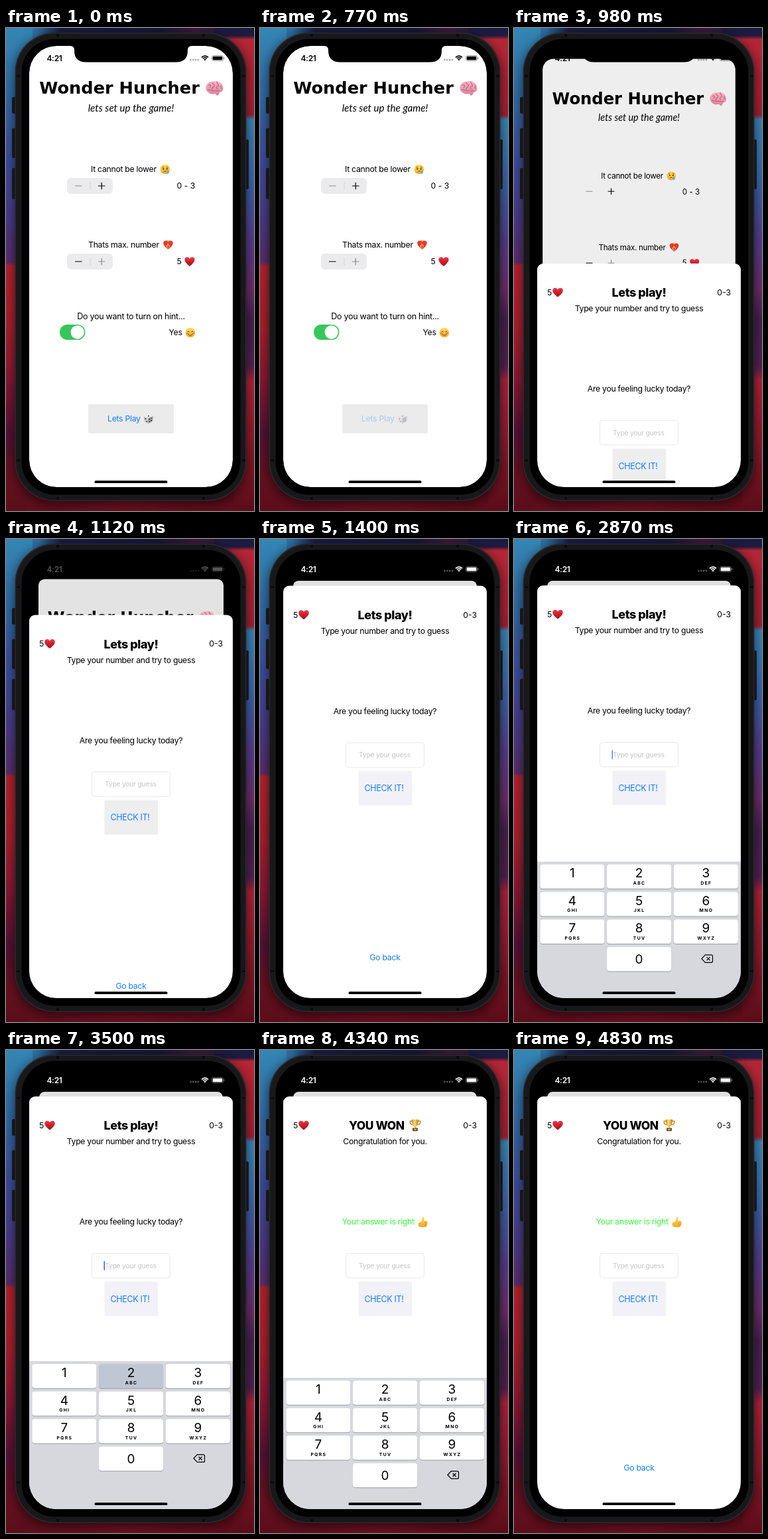
Write an HTML page with a canvas that moves like this. It is 374 px wide and 728 px high and loops after 5.46 s.

```html
<!DOCTYPE html>
<html lang="en">
<head>
<meta charset="utf-8">
<title>Guessing game</title>
<style>
html, body { margin: 0; width: 100%; height: 100%; overflow: hidden; background: #000; }
canvas { display: block; width: 374px; height: 728px; }
</style>
</head>
<body>
<canvas id="stage"></canvas>
<script>
const W = 374, H = 728, LOOP = 5460, STEP = 70;
const BLUE = '#147efb', INK = '#000', GREY = '#8b8b8e';
const canvas = document.getElementById('stage');
const ratio = window.devicePixelRatio || 1;
canvas.width = W * ratio;
canvas.height = H * ratio;
const c = canvas.getContext('2d');

const clamp = v => Math.max(0, Math.min(1, v));
const lerp = (a, b, p) => a + (b - a) * p;
const ramp = (t, a, b) => clamp((t - a) / (b - a));
const grey = v => `rgb(${v},${v},${v})`;

// Critically damped spring from 0 to 1
function spring(t, start) {
  const x = Math.max(0, t - start) * 0.0178;
  return 1 - (1 + x) * Math.exp(-x);
}

function box(x, y, w, h, r, fill) {
  c.beginPath();
  c.roundRect(x, y, w, h, r);
  c.fillStyle = fill;
  c.fill();
}

function oval(x, y, rx, ry, fill) {
  c.beginPath();
  c.ellipse(x, y, rx, ry, 0, 0, 7);
  c.fillStyle = fill;
  c.fill();
}

function line(d, color, width) {
  c.strokeStyle = color;
  c.lineWidth = width;
  c.stroke(new Path2D(d));
}

function shape(d, fill) {
  c.fillStyle = fill;
  c.fill(new Path2D(d));
}

function fade(x0, y0, x1, y1, stops) {
  const g = c.createLinearGradient(x0, y0, x1, y1);
  stops.forEach(([at, color]) => g.addColorStop(at, color));
  return g;
}

// y is the middle of the capitals
function text(str, x, y, o = {}) {
  const size = o.size || 12.3;
  c.font = `${o.style || ''} ${o.weight || 400} ${size}px ${o.family || 'Inter, sans-serif'}`;
  c.letterSpacing = (o.track ?? -0.025) * size + 'px';
  c.textAlign = o.align || 'left';
  c.fillStyle = o.color || INK;
  c.fillText(str, x, y + size * 0.364);
}
const mid = (str, x, y, o) => text(str, x, y, { ...o, align: 'center' });

// Pictograms live in a 24 unit box
const HEART = 'M12 22C5 17 1 12 1 7.5C1 2 9 0 12 6C15 0 23 2 23 7.5C23 12 19 17 12 22Z';

function face() {
  oval(12, 12, 11, 11, fade(0, 1, 0, 23, [[0, '#ffdf5a'], [1, '#f2a925']]));
}

const icons = {
  heart() {
    shape(HEART, fade(0, 2, 0, 22, [[0, '#e8404a'], [0.5, '#cf1d2a'], [1, '#a3121e']]));
  },
  flame() {
    shape('M6 8C5 4 8 4 9 0C12 2 12 4 14 1C17 3 19 5 18 9Z', '#f5a13c');
    shape(HEART, '#e23b36');
    shape('M8 18C6 13 10 12 11 8C14 11 17 13 15 18L12 21Z', '#f79a3a');
    shape('M10 18C10 15 12 15 12 12C14 15 15 16 13 19Z', '#e23b36');
  },
  brain() {
    shape('M1 13C0 7 4 3 10 3C16 1 23 5 23 11C24 15 21 17 18.5 17C18 21 15 23 13.5 19C9 20 3 19 1 13Z',
      fade(0, 2, 0, 21, [[0, '#f9b9c6'], [1, '#dc7f98']]));
    line('M4 8C7 6 8 9 6 11M9 4C9 7 12 6 12 9C10 11 8 11 9 14M15 3C14 6 18 6 17 9C14 9 14 12 16 13M21 8C19 9 20 12 22 12M3 14C7 13 8 16 11 15C13 14 15 16 19 15', '#c0637f', 1);
  },
  cry() {
    face();
    oval(8, 11, 1.5, 2, '#5b3a14');
    oval(16, 11, 1.5, 2, '#5b3a14');
    line('M8.5 18C10 15.5 14 15.5 15.5 18M5 8L9 6M15 6L19 8', '#5b3a14', 1.3);
    shape('M18 13C22 18 21 22 18 22C15 22 15 18 18 13Z', '#55aef0');
  },
  smile() {
    face();
    oval(5.5, 14, 3, 2, '#f18a52');
    oval(18.5, 14, 3, 2, '#f18a52');
    line('M5.5 11C6.5 8.5 8.5 8.5 9.5 11M14.5 11C15.5 8.5 17.5 8.5 18.5 11M7 15C9 19.5 15 19.5 17 15', '#5b3a14', 1.4);
  },
  die() {
    shape('M2 7L13 1L22 6L21 17L11 23L3 18Z', '#c9c9cb');
    shape('M2 7L13 1L22 6L11 11Z', '#efeff0');
    shape('M11 11L22 6L21 17L11 23Z', '#a5a5a9');
    [[12, 6], [5, 12], [8, 18], [14, 13], [18, 11], [14, 18], [18, 16]]
      .forEach(([x, y]) => oval(x, y, 1.4, 1.3, '#333'));
  },
  trophy() {
    line('M6 4H2C2 9 4 11 8 11M18 4H22C22 9 20 11 16 11', '#c58a22', 1.8);
    shape('M5.5 1H18.5C18.5 9 16.5 13 13.5 14V18H10.5V14C7.5 13 5.5 9 5.5 1Z',
      fade(5, 0, 19, 0, [[0, '#b97a18'], [0.4, '#ffe07a'], [1, '#b5761a']]));
    box(7, 17, 10, 6, 1, '#6a4526');
    box(9.5, 18.5, 5, 2.5, 0, '#e0b04a');
  },
  thumb() {
    shape('M9 10C11 7 10 4 11 1C15 0 16 4 14 9H20C23 9 23 12 21.5 13C23 14 23 16 21.5 16.5C22.5 18 21.5 20 20 20C20 22 18 23 16 23H9C4 23 1 20 2 15C3 11 7 12 9 10Z',
      fade(0, 1, 0, 23, [[0, '#ffd75c'], [1, '#f0a92c']]));
    line('M15 13H21M15 16.6H21M15 20H20', '#c9821f', 0.9);
  }
};

function icon(name, x, y, size) {
  c.save();
  c.translate(x - size / 2, y - size / 2);
  c.scale(size / 24, size / 24);
  icons[name]();
  c.restore();
}

function wallpaper() {
  c.fillStyle = fade(0, 0, W, 0, [[0, '#3486b4'], [0.13, '#2b6d9e'], [0.22, '#1b1d42'],
    [0.62, '#17173a'], [0.76, '#3c1b3a'], [0.9, '#231a3e'], [1, '#1b1a40']]);
  c.fillRect(0, 0, W, 60);
  c.fillStyle = fade(0, 0, 0, H, [[0, '#3486b4'], [0.14, '#2f6ca6'], [0.28, '#3d4b9c'],
    [0.4, '#4b3a88'], [0.485, '#5a2c6c'], [0.492, '#b4222d'], [0.62, '#a81f2c'],
    [0.72, '#8c1834'], [0.84, '#551034'], [0.93, '#66101f'], [1, '#5a0d1a']]);
  c.fillRect(0, 0, 40, H);
  c.fillStyle = fade(0, 0, 0, H, [[0, '#1b1a40'], [0.016, '#1f1a3f'], [0.024, '#b52635'],
    [0.15, '#a92132'], [0.18, '#a02034'], [0.19, '#3a86b8'], [0.32, '#3964ac'],
    [0.44, '#563c90'], [0.54, '#6e2c6c'], [0.6, '#482050'], [0.7, '#532052'],
    [0.73, '#b0213a'], [0.87, '#8a1828'], [1, '#5a0c18']]);
  c.fillRect(314, 0, 60, H);
  c.fillStyle = fade(0, 0, W, 0, [[0, '#5c0d1b'], [0.5, '#6d1020'], [1, '#5a0c18']]);
  c.fillRect(30, 690, 314, 38);
}

function phone() {
  const side = '#1d1d20';
  [[104, 25], [151, 45], [211, 47]].forEach(([y, h]) => box(9, y, 8, h, 2, side));
  box(360, 168, 6, 75, 2, side);
  c.shadowColor = 'rgba(0,0,0,0.6)';
  c.shadowBlur = 18 * ratio;
  c.shadowOffsetY = 4 * ratio;
  box(13.5, 7, 349, 706, 59, '#29292c');
  c.shadowColor = 'transparent';
  box(15, 8.5, 346, 703, 58, '#18181a');
  [[76, 9], [296, 9], [76, 707], [296, 707]].forEach(([x, y]) => box(x, y, 4, 4, 0, '#0b0b0c'));
  [71, 650].forEach(y => {
    box(16, y, 5, 3, 0, '#0b0b0c');
    box(356, y, 5, 3, 0, '#0b0b0c');
  });
  box(23.5, 16.5, 330, 687, 50, '#000');
}

function statusBar(p) {
  const ink = grey(Math.round(255 * p));
  mid('4:21', 73, 45.5, { size: 12, weight: 600, color: ink });
  c.globalAlpha = 0.32;
  for (let i = 0; i < 4; i++) oval(278.5 + i * 3.8, 48, 1.4, 1.4, ink);
  c.globalAlpha = 1;
  c.lineCap = 'butt';
  [6.8, 4.1].forEach(r => {
    c.beginPath();
    c.arc(300, 49, r, -Math.PI * 0.76, -Math.PI * 0.24);
    c.strokeStyle = ink;
    c.lineWidth = 1.8;
    c.stroke();
  });
  shape('M300 49.5L298.2 47.2Q300 45.6 301.8 47.2Z', ink);
  c.globalAlpha = 0.4;
  c.beginPath();
  c.roundRect(310.5, 41.5, 17, 8, 2.4);
  c.strokeStyle = ink;
  c.lineWidth = 0.9;
  c.stroke();
  box(328.3, 44, 1.2, 3, 0.6, ink);
  c.globalAlpha = 1;
  box(311.7, 42.7, 14.6, 5.6, 1.4, ink);
}

function stepper(y, less, more, p) {
  c.globalAlpha = clamp(1 - 2 * p);
  box(92, y, 69, 24, 6, '#ebebed');
  box(126.5, y + 6, 1, 12, 0, '#d6d6d9');
  c.globalAlpha = 1;
  box(104, y + 11.4, 10.5, 1.2, 0, less);
  box(139, y + 11.4, 10.5, 1.2, 0, more);
  box(143.6, y + 6.8, 1.2, 10.5, 0, more);
}

function setup(t, p) {
  const k = lerp(1, 0.902, p);
  c.save();
  c.translate(188.5, lerp(27, 63, p));
  c.scale(k, k);
  c.translate(-188.5, -27);
  box(35, 27, 307, 665, lerp(41, 9, Math.sqrt(p)), grey(Math.round(255 * (1 - 0.12 * p))));

  mid('Wonder Huncher', 171, 90, { size: 25.6, weight: 700, track: 0, family: '"DejaVu Sans", sans-serif' });
  icon('brain', 314.5, 91, 28);
  mid('lets set up the game!', 188.5, 120, { size: 15.2, style: 'italic', track: 0, family: 'Lato, sans-serif' });

  text('It cannot be lower', 128, 213);
  icon('cry', 240, 213, 16);
  stepper(226, GREY, INK, p);
  text('0 - 3', 257.5, 238, { track: 0 });

  text('Thats max. number', 124, 327);
  icon('flame', 244.5, 327, 16);
  stepper(340, INK, GREY, p);
  text('5', 257.5, 352);
  icon('heart', 277, 352, 16.5);

  mid('Do you want to turn on hint...', 188.5, 434, { size: 12.6 });
  box(81, 447, 38.5, 23, 11.5, '#36c75a');
  oval(107.7, 458.5, 10.2, 10.2, '#fff');
  text('Yes', 245.5, 459);
  icon('smile', 278, 459, 16);

  box(124, 567, 129, 44, 2, '#ebebec');
  c.globalAlpha = t >= 700 ? lerp(0.3, 1, ramp(t, 770, 980)) : 1;
  text('Lets Play', 153, 589, { color: BLUE });
  icon('die', 215, 589, 16.5);
  c.globalAlpha = 1;
  c.restore();
}

function caretAlpha(t) {
  if (t < 3080) return lerp(0.3, 0.75, ramp(t, 2590, 2870));
  if (t < 3290) return 1 - ramp(t, 3080, 3220);
  return ramp(t, 3290, 3430);
}

function game(t, p) {
  const won = t >= 4340;
  const typed = t >= 3570 && !won;
  c.save();
  c.translate(0, lerp(622, 0, p));
  box(35, 70, 307, 640, [9, 9, 0, 0], '#fff');

  text('5', 50, 113.5);
  icon('heart', 66, 113.5, 17);
  text('0-3', 327, 113.5, { align: 'right', track: 0 });
  if (won) {
    text('YOU WON', 134, 113.5, { size: 17.4, weight: 800 });
    icon('trophy', 234, 113.5, 19);
    mid('Congratulation for you.', 188.5, 138);
    text('Your answer is right', 123.5, 259, { color: '#3bf53f' });
    icon('thumb', 245.5, 259.5, 16.5);
  } else {
    mid('Lets play!', 188.5, 113.5, { size: 18, weight: 800 });
    mid('Type your number and try to guess', 188.5, 138);
    mid('Are you feeling lucky today?', 188.5, 259);
  }

  c.beginPath();
  c.roundRect(129.5, 306.5, 118, 37, 4);
  c.strokeStyle = '#e8e8ea';
  c.lineWidth = 1;
  c.stroke();
  if (typed) text('2', 149, 325, { size: 10.4 });
  else text('Type your guess', 149, 325, { size: 10.4, color: '#c6c6c9' });
  if (t >= 2590 && !won) {
    c.globalAlpha = caretAlpha(t);
    box(typed ? 156 : 147.5, 318, 1.6, 14, 0.8, '#3f63d6');
    c.globalAlpha = 1;
  }

  box(148.5, 349, 80.5, 52, 1, p < 0.95 ? '#eeeeef' : '#f2f1f8');
  c.globalAlpha = t >= 4130 && t < 4340 ? 0.35 : 1;
  mid('CHECK IT!', 187, 375.3, { size: 12.5, color: BLUE });
  c.globalAlpha = 1;
  mid('Go back', 188.5, 629.5, { color: BLUE });
  c.restore();
}

const LETTERS = ['', 'ABC', 'DEF', 'GHI', 'JKL', 'MNO', 'PQRS', 'TUV', 'WXYZ'];

function key(x, y, digit, letters, fill) {
  box(x, y + 1, 97, 36.5, 4, '#9a9ca1');
  box(x, y, 97, 36.5, 4, fill);
  mid(digit, x + 48.5, y + (digit === '0' ? 18 : 13), { size: 19, track: 0 });
  if (letters) mid(letters, x + 49, y + 28, { size: 6.8, weight: 700, track: 0.19 });
}

function keyboard(t) {
  const up = spring(t, 2633) - spring(t, 4308);
  if (up < 0.002) return;
  c.save();
  c.translate(0, 692 - 223 * up);
  box(35, 0, 307, 240, 0, '#d6d8de');
  LETTERS.forEach((letters, i) => {
    const held = i === 1 && t >= 3430 && t < 3710;
    key(39.3 + i % 3 * 100.8, 4.3 + Math.floor(i / 3) * 41.5, String(i + 1), letters,
      held ? (t < 3640 ? '#bec7d3' : '#dde1e8') : '#fff');
  });
  key(140.1, 128.8, '0', '', '#fff');
  c.lineJoin = 'round';
  line('M283 146.5L288.3 140.8H297.5Q299.5 140.8 299.5 142.8V150.2Q299.5 152.2 297.5 152.2H288.3Z', INK, 1.2);
  line('M290.6 144L295.6 149M295.6 144L290.6 149', INK, 1.2);
  c.restore();
}

function notch() {
  shape('M97 26H280V27Q274 27.5 274 33V34Q274 51.5 256 51.5H121Q103 51.5 103 34V33Q103 27.5 97 27Z', '#000');
}

function draw(t) {
  const p = spring(t, 878);
  c.setTransform(ratio, 0, 0, ratio, 0, 0);
  wallpaper();
  phone();
  c.save();
  c.beginPath();
  c.roundRect(35, 27, 307, 665, 41);
  c.clip();
  setup(t, p);
  notch();
  statusBar(ramp(t, 1050, 1260));
  if (p > 0) game(t, p);
  keyboard(t);
  box(133.5, 682.3, 110, 3.8, 1.9, '#000');
  c.restore();
}

const begin = performance.now();
function tick() {
  const t = (performance.now() - begin) % LOOP;
  draw(Math.floor(t / STEP) * STEP);
  requestAnimationFrame(tick);
}
tick();
</script>
</body>
</html>
```
